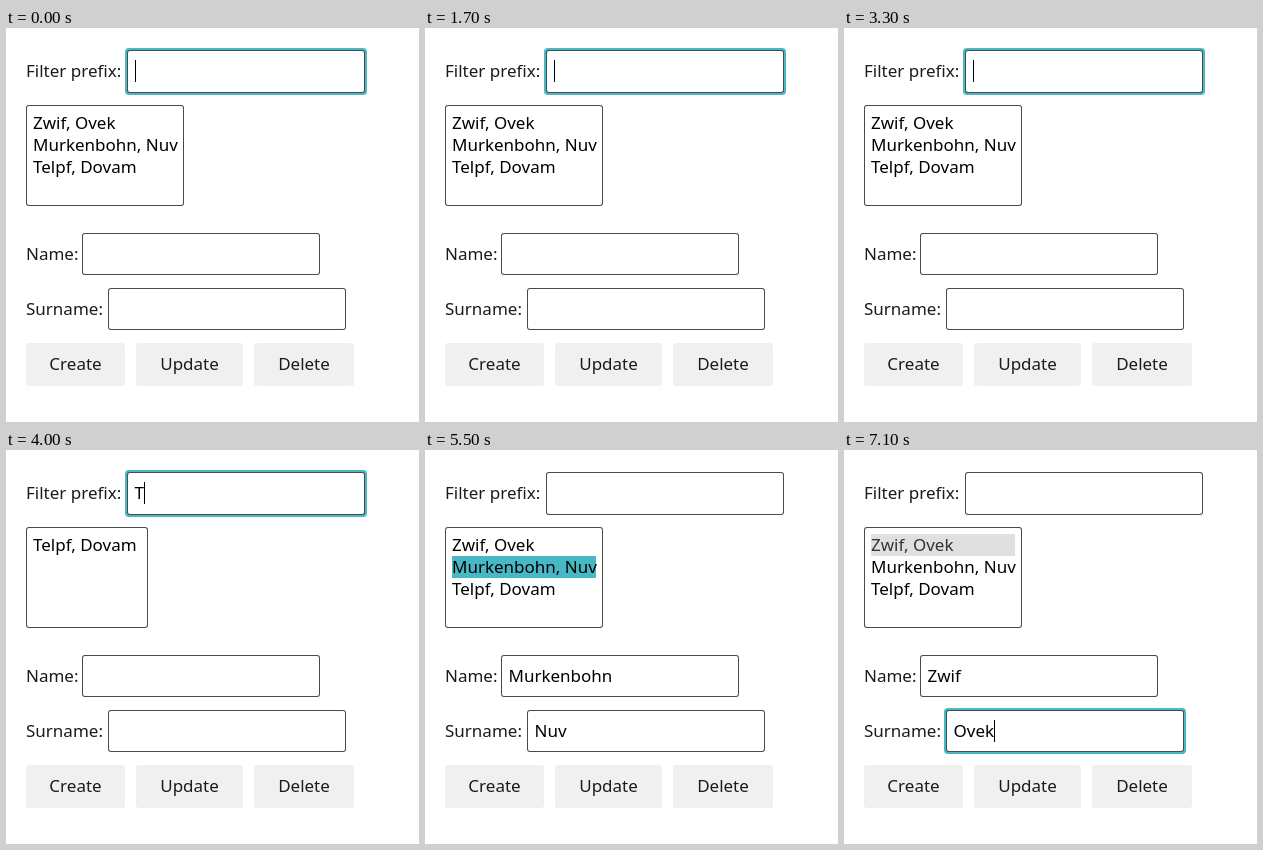
Animation, 413 px wide and 394 px high, one loop 8 s. Source, as an HTML page with a canvas:

```html
<!DOCTYPE html>
<html lang="en">
<head>
<meta charset="utf-8">
<title>Filtered list form</title>
<style>
  html, body { margin: 0; width: 100%; height: 100%; overflow: hidden; background: #fff; }
  canvas { display: block; }
</style>
</head>
<body>
<canvas id="stage" width="413" height="394"></canvas>
<script>
const ctx = document.getElementById('stage').getContext('2d');
const LOOP = 8000;
const TEAL = '#48b8c5', GREY = '#e0e0e0', BORDER = '#4a4a4a', INK = '#1b1b1b';

const people = [
  { name: 'Zwif', surname: 'Ovek', listWidth: 100 },
  { name: 'Murkenbohn', surname: 'Nuv', listWidth: 158 },
  { name: 'Telpf', surname: 'Dovam', listWidth: 122 },
];

const fields = {
  filter: { label: 'Filter prefix:', x: 121, y: 22, h: 43, baseline: 49 },
  name: { label: 'Name:', x: 76, y: 205, h: 42, baseline: 232 },
  surname: { label: 'Surname:', x: 102, y: 260, h: 42, baseline: 287 },
};

const buttons = [['Create', 20, 99], ['Update', 130, 107], ['Delete', 248, 100]];

// Each step changes only the listed parts of the state.
const steps = [
  [0, { filter: '', focus: 'filter', caret: true, selected: -1, shown: -1, mark: TEAL }],
  [100, { caret: false }],
  [600, { filter: 'Z', caret: true }],
  [1300, { caret: false }],
  [1400, { filter: 'Zw', caret: true }],
  [1600, { filter: 'Z' }],
  [1700, { filter: '' }],
  [2400, { filter: 'M' }],
  [2600, { filter: 'Mu' }],
  [2700, { caret: false }],
  [2800, { filter: 'Mur', caret: true }],
  [3300, { filter: '' }],
  [3700, { caret: false }],
  [4000, { filter: 'T', caret: true }],
  [4400, { filter: '' }],
  [4900, { caret: false }],
  [5500, { focus: '', selected: 1, shown: 1 }],
  [5900, { selected: 0 }],
  [6000, { shown: 0 }],
  [7100, { focus: 'surname', caret: true, mark: GREY }],
];

function stateAt(time) {
  return Object.assign({}, ...steps.filter(([start]) => start <= time).map(([, change]) => change));
}

function text(string, x, baseline, color = '#000') {
  ctx.fillStyle = color;
  ctx.fillText(string, x, baseline);
}

function fillRound(x, y, w, h, radius, color) {
  ctx.fillStyle = color;
  ctx.beginPath();
  ctx.roundRect(x, y, w, h, radius);
  ctx.fill();
}

function frame(x, y, w, h) {
  fillRound(x, y, w, h, 3, BORDER);
  fillRound(x + 1, y + 1, w - 2, h - 2, 2, '#fff');
}

function drawField({ label, x, y, h, baseline }, value, focused, caret) {
  text(label, 20, baseline, INK);
  if (focused) fillRound(x - 2, y - 2, 242, h + 4, 4, TEAL);
  frame(x, y, 238, h);
  text(value, x + 7.5, baseline);
  if (focused && caret) {
    ctx.fillRect(Math.round(x + 7.5 + ctx.measureText(value).width), baseline - 17, 1, 22);
  }
}

function drawList({ filter, selected, mark }) {
  const rows = people.filter(person => person.name.startsWith(filter));
  const [width] = rows.map(person => person.listWidth).sort((a, b) => b - a);
  frame(20, 77, width, 101);
  rows.forEach((person, i) => {
    const active = person === people[selected];
    const top = 84 + 22 * i;
    if (active) {
      ctx.fillStyle = mark;
      ctx.fillRect(27, top, width - 14, 22);
    }
    text(`${person.name}, ${person.surname}`, 27, top + 17, active && mark === GREY ? '#333' : '#000');
  });
}

function draw(state) {
  ctx.fillStyle = '#fff';
  ctx.fillRect(0, 0, 413, 394);
  ctx.font = '17px "Noto Sans", sans-serif';
  ctx.textAlign = 'left';
  const values = { name: '', surname: '', ...people[state.shown], filter: state.filter };
  for (const key in fields) drawField(fields[key], values[key], state.focus === key, state.caret);
  drawList(state);
  ctx.textAlign = 'center';
  for (const [label, x, width] of buttons) {
    fillRound(x, 315, width, 43, 3, '#f0f0f0');
    text(label, x + width / 2, 342, INK);
  }
}

const start = performance.now();
function tick() {
  draw(stateAt((performance.now() - start) % LOOP));
  requestAnimationFrame(tick);
}
tick();
</script>
</body>
</html>
```
